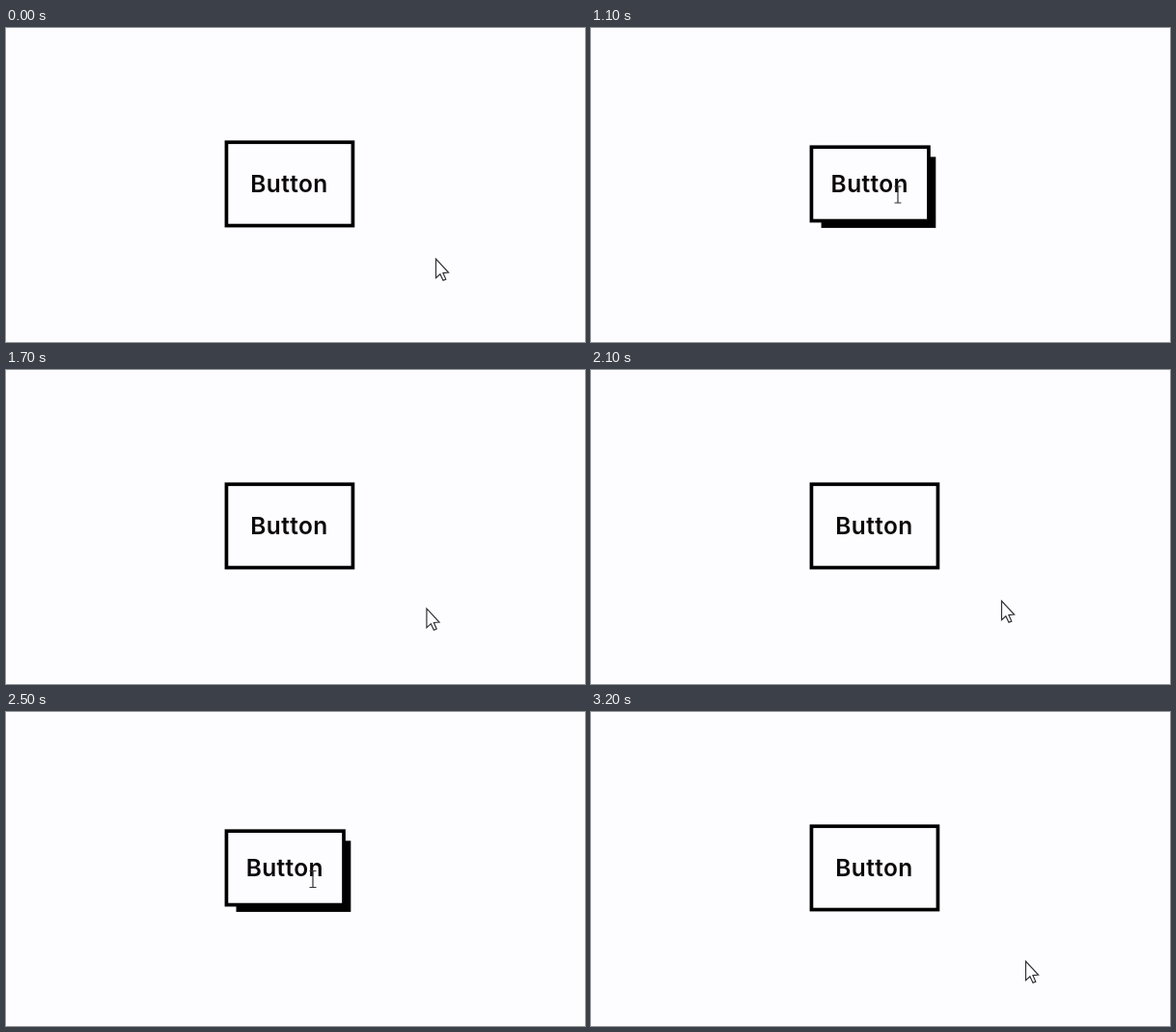
Animation of 600 by 325 pixels, one loop 3.3 s. Source, as an HTML page:

```html
<!DOCTYPE html>
<html lang="en">
<head>
<meta charset="utf-8">
<title>Button hover</title>
<style>
  html, body { margin: 0; width: 100%; height: 100%; overflow: hidden; background: #fdfcfe; }
  svg { display: block; width: 600px; height: 325px; }
  text { font: 600 24.5px Inter, sans-serif; letter-spacing: .4px; text-anchor: middle; fill: #0a0808; }
  #box { fill: #fdfcfe; stroke: #000; stroke-width: 3.7; }
  #arrow { fill: #fff; stroke: #333138; stroke-width: 1.2; }
  #beam { fill: none; stroke: #333; stroke-width: 1.2; }
</style>
</head>
<body>
<svg viewBox="0 0 600 325">
  <rect id="shadow"/>
  <rect id="box"/>
  <text id="label" y="170.3">Button</text>
  <path id="arrow" d="M.5 0V19.7L4.9 15.7L8 22.3L10.8 21.1L7.9 14.6L13.6 14.1Z"/>
  <path id="beam" d="M-3.5 -8.5H3.5M0 -8.5V8.5M-3.5 8.5H3.5"/>
</svg>
<script>
const LOOP = 3300, STEP = 100, FADE = 300;
const hovers = [[570, 1260], [2230, 2850]];

// Pointer moves: from and to in ms, where to, and how far the path sags
const home = [445, 239];
const moves = [
  { from: 150, to: 770, x: 318, y: 172.5, sag: 15 },
  { from: 1150, to: 1400, x: 450, y: 258, sag: 0 },
  { from: 1450, to: 1900, x: 425, y: 239, sag: 0 },
  { from: 2100, to: 2340, x: 318, y: 173, sag: 15 },
  { from: 2750, to: 3000, x: 450, y: 258, sag: 0 }
];

const $ = id => document.getElementById(id);
const set = (id, attrs) => {
  for (const k in attrs) $(id).setAttribute(k, attrs[k]);
};
const clamp = v => Math.min(1, Math.max(0, v));
const smooth = f => f * f * (3 - 2 * f);

// The CSS "ease" curve, solved by bisection
function ease(x) {
  if (x <= 0) return 0;
  if (x >= 1) return 1;
  let lo = 0, hi = 1, s;
  for (let i = 0; i < 20; i++) {
    s = (lo + hi) / 2;
    if (.75 * s * (1 - s) + s ** 3 < x) lo = s; else hi = s;
  }
  return .3 * s * (1 - s) ** 2 + 3 * s * s * (1 - s) + s ** 3;
}

function pointer(t) {
  return moves.reduce(([px, py], { from, to, x, y, sag }) => {
    const f = clamp((t - from) / (to - from)), e = smooth(f);
    return [px + (x - px) * e, py + (y - py) * e + sag * Math.sin(Math.PI * f)];
  }, home);
}

function draw(t) {
  const p = hovers.reduce((sum, [on, off]) =>
    sum + ease((t - on) / FADE) - ease((t - off) / FADE), 0);

  const x = 226.6, y = 116.4 + 5 * p, w = 134.7 - 9.5 * p, h = 90 - 10 * p;
  set('box', { x: x + 1.85, y: y + 1.85, width: w - 3.7, height: h - 3.7 });
  set('shadow', {
    x: x + 12 * p, y: y + 12 * p,
    width: w - 6.5 * p, height: h - 6.5 * p, 'fill-opacity': p
  });
  set('label', { x: 293.5 - 4.7 * p });

  const [cx, cy] = pointer(t), overText = cx < 335;
  const transform = `translate(${cx} ${cy})`;
  set('arrow', { transform, visibility: overText ? 'hidden' : 'visible' });
  set('beam', { transform, visibility: overText ? 'visible' : 'hidden' });
}

const start = performance.now();
function tick() {
  const t = (performance.now() - start) % LOOP;
  draw(Math.floor(t / STEP) * STEP);
  requestAnimationFrame(tick);
}
tick();
</script>
</body>
</html>
```
